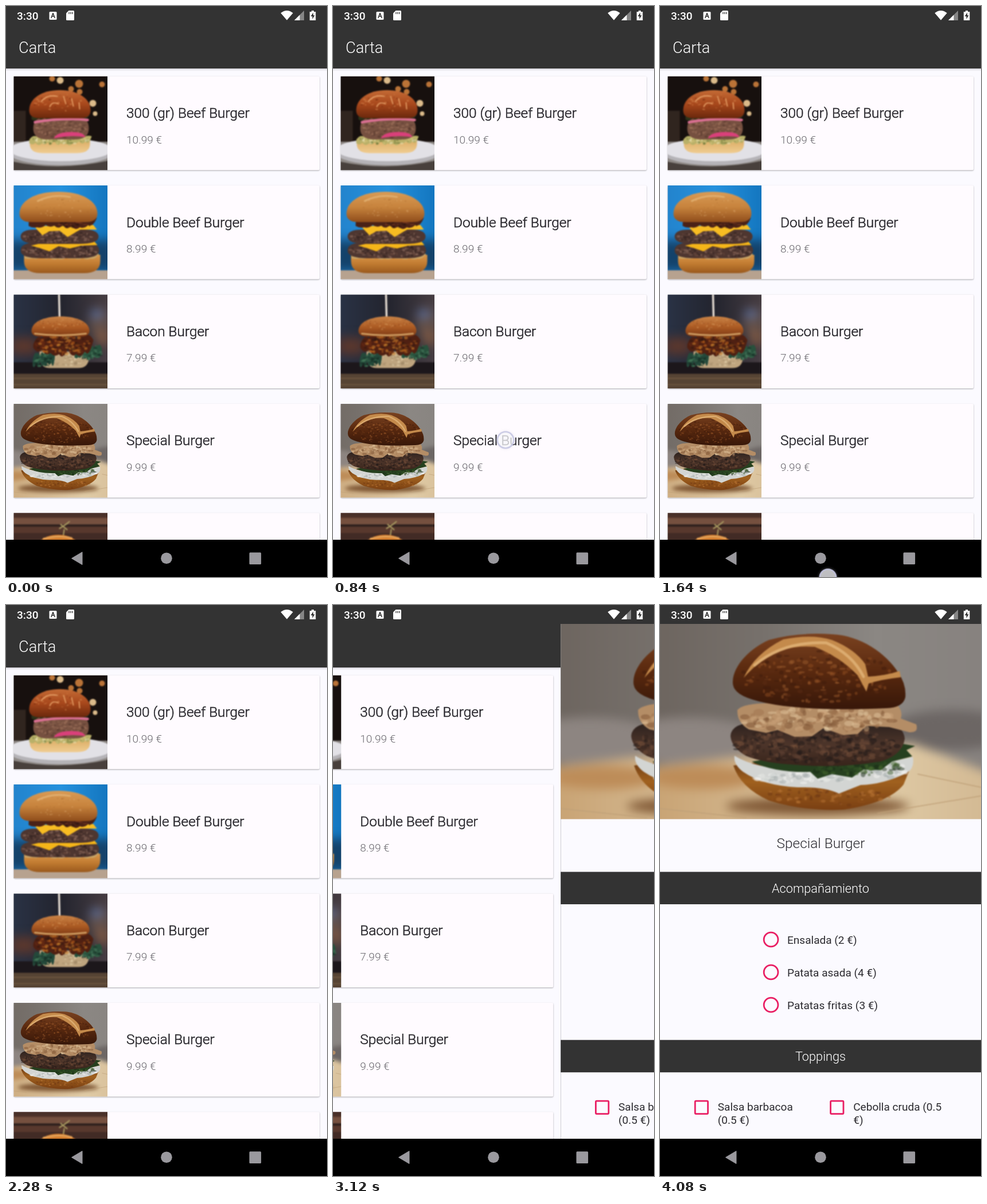
An HTML page for the animation above (4.12 s loop, 560 px wide and 996 px high).

```html
<!DOCTYPE html>
<html lang="es">
<head>
<meta charset="utf-8">
<title>Carta</title>
<style>
html, body { margin: 0; height: 100%; overflow: hidden; background: #000; }
svg { display: block; }
text { font-family: Roboto, sans-serif; fill: #2c2b30; }
.light { font-weight: 300; }
.title { font-weight: 300; font-size: 24.4px; }
.strong { stroke: #2c2b30; stroke-width: .6px; }
.price { font-weight: 300; font-size: 19.06px; fill: #6b696f; }
.bar { font-weight: 300; font-size: 21.78px; fill: #fff; text-anchor: middle; }
.option { font-size: 19.06px; }
.card { fill: #fffbff; filter: drop-shadow(0 1px 1.2px #0005); }
.pink { fill: none; stroke: #e91e63; stroke-width: 2.8px; }
.soft { filter: blur(.8px); }
.blurred { filter: blur(9px); }
#pointer { filter: drop-shadow(0 0 2px #ccd8); }
</style>
</head>
<body>
<svg id="stage" width="100%" height="100%" viewBox="0 0 560 996"></svg>
<script>
const LOOP = 4120;
const stage = document.getElementById('stage');

let seed = 7;
const rand = () => (seed = seed * 16807 % 2147483647) / 2147483647;

const rect = (x, y, w, h, fill, rx = 0) =>
  `<rect x="${x}" y="${y}" width="${w}" height="${h}" fill="${fill}" rx="${rx}"/>`;
const ellipse = (x, y, rx, ry, fill, extra = '') =>
  `<ellipse cx="${x}" cy="${y}" rx="${rx}" ry="${ry}" fill="${fill}" ${extra}/>`;
const path = (d, fill, extra = '') => `<path d="${d}" fill="${fill}" ${extra}/>`;
const line = (d, color, width) =>
  path(d, 'none', `stroke="${color}" stroke-width="${width}" stroke-linecap="round" stroke-linejoin="round"`);
const text = (x, y, cls, str, extra = '') => `<text x="${x}" y="${y}" class="${cls}" ${extra}>${str}</text>`;
const crop = (x, y, w, h, body) => `<svg x="${x}" y="${y}" width="${w}" height="${h}">${body}</svg>`;
const group = (cls, ...parts) => `<g class="${cls}">${parts.join('')}</g>`;

const grad = (id, dir, ...colors) =>
  `<linearGradient id="${id}" x2="${dir === 'h' ? 1 : 0}" y2="${dir === 'h' ? 0 : 1}">` +
  colors.map((c, i) => `<stop offset="${i / (colors.length - 1)}" stop-color="${c}"/>`).join('') +
  '</linearGradient>';

// Bun top, patty and bun base between the given edges
function dome(l, r, t, b, fill) {
  const w = r - l, h = b - t, m = (l + r) / 2, k = b - h * .28;
  return path(`M${l} ${k}C${l} ${t + h * .3} ${l + w * .2} ${t} ${m} ${t}S${r} ${t + h * .3} ${r} ${k}` +
    `Q${r} ${b} ${r - w * .16} ${b}H${l + w * .16}Q${l} ${b} ${l} ${k}Z`, fill);
}

function patty(l, r, t, b, fill) {
  const w = r - l, m = (t + b) / 2;
  return path(`M${l} ${m}Q${l} ${t} ${l + w * .18} ${t}H${r - w * .18}Q${r} ${t} ${r} ${m}` +
    `Q${r} ${b} ${r - w * .26} ${b}H${l + w * .26}Q${l} ${b} ${l} ${m}Z`, fill);
}

function base(l, r, t, b, fill) {
  const w = r - l, k = t + (b - t) * .35;
  return path(`M${l} ${t}H${r}V${k}Q${r} ${b} ${r - w * .22} ${b}H${l + w * .22}Q${l} ${b} ${l} ${k}Z`, fill);
}

// Irregular strip for sauce, cheese and leaves
function ragged(l, r, t, b, n, fill) {
  const step = (r - l) / n, h = b - t;
  let d = `M${l} ${t + h * .5}`;
  for (let i = 1; i <= n; i++) d += `Q${l + (i - .5) * step} ${t - h * .3 * rand()} ${l + i * step} ${t + h * .3 * rand()}`;
  for (let i = n; i > 0; i--) d += `Q${l + (i - .5) * step} ${b + h * .4 * rand()} ${l + (i - 1) * step} ${b - h * .4 * rand()}`;
  return path(d + 'Z', fill);
}

function specks(n, x, y, rx, ry, size, ...colors) {
  let out = '';
  for (let i = 0; i < n; i++) {
    const a = rand() * 6.283, d = Math.sqrt(rand());
    out += ellipse((x + Math.cos(a) * d * rx).toFixed(1), (y + Math.sin(a) * d * ry).toFixed(1),
      (size * (.4 + rand())).toFixed(1), (size * (.3 + rand() * .6)).toFixed(1),
      colors[i % colors.length], 'opacity=".5"');
  }
  return out;
}

const defs = '<defs>' +
  grad('glazed', 'v', '#c46b35', '#a8481c', '#6a270c') +
  grad('golden', 'v', '#d99b55', '#c7833d', '#8f4d1b') +
  grad('base', 'v', '#d9964a', '#c07a30', '#99591d') +
  grad('pale', 'v', '#d9a95f', '#f0cd92') +
  grad('meat', 'v', '#2b211e', '#4d352a', '#38241b') +
  grad('sky', 'h', '#2383cc', '#2591dd', '#1274bd') +
  grad('dusk', 'h', '#2a3346', '#23242e', '#493f44') +
  grad('toasted', 'v', '#c98346', '#ae5d25', '#7c3914') +
  grad('pretzel', 'v', '#7a4220', '#59290f', '#371709') +
  grad('crust', 'v', '#5a2c0e', '#a0611f', '#7a3f12') +
  grad('wall', 'h', '#6d655f', '#77716c', '#8b8783', '#87827f') +
  grad('wood', 'h', '#c8a272', '#d3b78f', '#e0cba6', '#d2b892') +
  '</defs>';

const tallBurger = group('soft',
  rect(-10, -30, 580, 400, 'url(#wall)'),
  group('blurred',
    ellipse(50, 205, 130, 42, '#8d8581'), ellipse(510, 185, 110, 35, '#6c6664'),
    path('M-20 250L130 232L440 208L580 262V400H-20Z', 'url(#wood)'),
    ellipse(75, 268, 95, 20, '#bd8c58'), ellipse(275, 318, 160, 16, '#7d5532')),
  line('M0 322L150 338M380 330L560 300M450 262L560 285', '#bfa078', 1.5),
  path('M128 247Q140 285 190 308Q250 327 320 324Q400 312 425 280L437 250L300 225Z', 'url(#crust)'),
  specks(90, 285, 302, 120, 15, 4, '#b87433', '#6d3814', '#8f501c'),
  path('M130 230Q165 252 240 255Q320 262 380 245L441 232Q445 252 430 260Q390 280 350 281L312 296Q290 284 240 285Q180 282 145 258Q128 245 130 230Z', '#d3d5d3'),
  specks(70, 250, 269, 90, 9, 5, '#f6f6f4', '#a4abab', '#e8e9e6'),
  specks(35, 400, 255, 35, 13, 5, '#f6f6f4', '#a4abab'),
  path('M160 240Q200 260 262 258L275 270L300 262L335 268L355 254L385 255L405 240L440 231L430 220L445 213L400 205Z', '#26401f'),
  specks(70, 345, 250, 85, 14, 5, '#46672d', '#182915', '#335426'),
  path('M123 195Q125 172 170 172H395Q425 178 427 200Q424 228 385 240Q310 252 240 246Q180 243 150 230Q124 215 123 195Z', 'url(#meat)'),
  specks(300, 273, 212, 143, 32, 5, '#1d1718', '#765039', '#34241d', '#5d4031'),
  path('M135 150Q150 134 230 140L410 138Q425 150 420 165L447 175Q452 190 435 189L400 180L360 178L345 192L320 194L285 182L265 196L235 197L205 185L185 190L155 184Q134 172 135 150Z', '#b48d66'),
  specks(150, 275, 167, 135, 20, 7, '#dfc39c', '#7d5334', '#cda57c', '#a0744d'),
  path('M127 100C128 72 158 42 190 28Q240 14 300 18C350 20 395 52 415 84Q430 105 428 128Q424 146 395 147Q290 152 215 143Q150 134 134 118Q126 110 127 100Z', 'url(#pretzel)'),
  specks(220, 275, 92, 132, 45, 4, '#8d4b20', '#401b0c', '#9a5a2b', '#5c2c13'),
  path('M146 94Q165 52 215 27Q265 17 300 28Q340 44 358 70L363 92Q395 90 418 82L420 93Q385 97 364 104L360 118L345 90Q315 58 270 40Q215 36 180 62Q160 78 146 94Z', '#c48a4b'),
  line('M165 72Q215 30 290 33Q335 52 355 92', '#dcac70', 5));

const photos = [
  group('soft',
    rect(-5, -5, 175, 175, '#17100e'),
    [[81, 7, 6], [67, 4, 5], [114, 13, 7], [138, 47, 6], [127, 64, 5], [115, 27, 5], [142, 65, 4], [100, 22, 5], [154, 14, 5]]
      .map(([x, y, r], i) => ellipse(x, y, r, r, i % 3 ? '#d7853e' : '#ffd9a0', 'opacity=".85"')).join(''),
    rect(-5, 60, 26, 55, '#30251f'),
    rect(-5, 114, 175, 60, '#8f8a87'),
    ellipse(82, 132, 92, 23, '#b5b3b7'), ellipse(82, 128, 90, 20, '#e2e1e6'),
    path('M-5 148Q80 167 170 146V170H-5Z', '#48403c'),
    base(28, 133, 109, 134, 'url(#pale)'),
    ragged(27, 136, 104, 118, 10, '#b9b068'), specks(60, 82, 111, 52, 7, 2.6, '#5d6d30', '#f3e8bb', '#d9c67e'),
    patty(34, 131, 72, 110, '#765040'),
    specks(140, 82, 90, 45, 17, 2.4, '#a57860', '#4f3329', '#906550'),
    path('M70 108Q75 97 100 97Q122 97 125 106Q100 102 70 108Z', '#d9407a'),
    ragged(31, 132, 65, 76, 9, '#2b3219'),
    line('M37 80Q82 72 129 76', '#d96f92', 4.5),
    dome(27, 134, 24, 73, 'url(#glazed)'),
    specks(40, 80, 48, 44, 18, 2, '#d98a50', '#7c2e0f'),
    line('M48 44Q58 31 76 35M63 53Q67 43 78 48M87 35L91 48M101 39L104 52M114 46L115 57', '#e6a067', 1.8)),
  group('soft',
    rect(-5, -5, 175, 175, 'url(#sky)'),
    group('blurred', rect(-15, 95, 195, 55, '#14426a')),
    rect(-5, 148, 175, 25, '#b7a28f'),
    base(18, 151, 121, 153, 'url(#base)'),
    ragged(19, 149, 119, 128, 9, '#c9a466'),
    patty(12, 149, 100, 127, '#4e3630'),
    specks(150, 80, 114, 64, 12, 2.6, '#9c7768', '#2c1e1c', '#6b4a3e'),
    path('M30 105L60 98L140 97L146 104L118 105L98 110L78 106L62 115L45 109Z', '#f4b519'),
    patty(12, 148, 77, 102, '#4e3630'),
    specks(150, 80, 90, 63, 11, 2.6, '#9c7768', '#2c1e1c', '#6b4a3e'),
    path('M35 71L139 69L145 77L116 77L94 90L80 79L62 80L50 87Z', '#f8bc22'),
    ragged(26, 145, 56, 73, 8, '#4a2217'),
    specks(30, 110, 66, 32, 8, 3, '#7d3b22', '#2c1410'),
    dome(10, 146, 11, 64, 'url(#golden)'),
    line('M42 27Q68 14 98 20', '#e0ad6d', 3),
    specks(40, 78, 40, 58, 18, 1.5, '#e3b479', '#a9692d')),
  group('soft',
    rect(-5, -5, 175, 175, 'url(#dusk)'),
    group('blurred', rect(-5, 75, 45, 30, '#5b372d'), ellipse(150, 49, 18, 28, '#62504a'), ellipse(145, 34, 12, 6, '#5474b2'), ellipse(155, 75, 10, 14, '#855b42')),
    rect(-5, 118, 175, 21, '#1c171b'), rect(-5, 138, 175, 32, '#564434'),
    line('M0 146H163M0 157H163', '#6d553e', 2),
    line('M79 0L80 40', '#e8dfd5', 3.4),
    base(45, 131, 99, 128, '#bfa57f'),
    specks(60, 88, 114, 36, 10, 2.6, '#e6d4b0', '#a18a67'),
    ragged(33, 72, 102, 126, 6, '#24483a'), ragged(106, 154, 88, 112, 7, '#28503c'),
    specks(60, 130, 100, 24, 13, 3, '#4d8463', '#162d24', '#376a4c'),
    specks(45, 52, 114, 18, 12, 3, '#44795a', '#162d24'),
    ragged(34, 139, 70, 104, 7, '#4f2012'),
    specks(140, 86, 87, 48, 17, 3.2, '#c4661c', '#6c2c14', '#d98a2e', '#2b1510'),
    dome(31, 132, 38, 73, 'url(#toasted)'),
    line('M37 68Q80 74 126 68', '#cf9d62', 3),
    specks(50, 82, 52, 42, 11, 1.4, '#e0a466', '#874119')),
  '<use href="#special" transform="translate(-43.5 7.5) scale(.44)"/>',
  group('soft',
    rect(-5, -5, 175, 175, '#58382d'), rect(-5, -5, 175, 12, '#493028'),
    rect(-5, 9, 175, 11, '#75503f'), rect(-5, 20, 175, 4, '#30211e'), rect(-5, 35, 175, 60, '#422b25'),
    line('M86 43L88 29M80 27L94 18M82 20L93 29M92 19L97 15', '#a79860', 2.2),
    dome(33, 122, 38, 95, '#cf7a2d'), line('M52 45Q80 38 101 44', '#e6a45a', 3))
];

const dishes = [
  ['300 (gr) Beef Burger', '10.99 €'],
  ['Double Beef Burger', '8.99 €'],
  ['Bacon Burger', '7.99 €'],
  ['Special Burger', '9.99 €'],
  ['', '']
];

const card = ([name, price], i) => {
  const y = 122.7 + i * 190.4;
  return `<rect class="card" x="13.5" y="${y}" width="533.5" height="163.5" rx="2"/>` +
    crop(13.5, y, 163.5, 163.5, photos[i]) +
    text(210, y + 72.5, 'title strong', name) + text(210, y + 116.8, 'price', price);
};

const menu = rect(0, 33, 560, 900, '#fbfaff') + rect(0, 109, 560, 2, '#dddce2') + rect(0, 111, 560, 2, '#f0eff5') +
  rect(0, 33, 560, 76, '#333') + text(22, 82, 'light', 'Carta', 'style="fill:#fff;font-size:27.2px"') +
  dishes.map(card).join('');

const heading = (y, label) => rect(0, y, 560, 56.5, '#333') + text(280, y + 36.7, 'bar', label);
const radio = (label, i) => `<circle class="pink" cx="193.6" cy="${583.5 + i * 57}" r="12.4"/>` +
  text(222, 590.5 + i * 57, 'option', label);
const check = (x, a, b) => `<rect class="pink" x="${x}" y="865.2" width="22.4" height="22.4" rx="1.5"/>` +
  text(x + 39.6, 882.3, 'option', a) + text(x + 39.6, 904.6, 'option', b);

const detail = rect(0, 33, 560, 900, '#fbfaff') +
  crop(0, 33, 560, 340.5, '<use href="#special"/>') +
  text(280.5, 423.7, 'title', 'Special Burger', 'text-anchor="middle"') +
  heading(465.5, 'Acompañamiento') +
  ['Ensalada (2 €)', 'Patata asada (4 €)', 'Patatas fritas (3 €)'].map(radio).join('') +
  heading(758.7, 'Toppings') +
  check(61.2, 'Salsa barbacoa', '(0.5 €)') + check(297.6, 'Cebolla cruda (0.5', '€)');

const statusBar = rect(0, 0, 560, 33, '#333') +
  text(19, 24.3, '', '3:30', 'style="fill:#fff;font-size:19.06px;font-weight:500"') +
  rect(75.5, 10, 13, 14, '#fff', 1.5) + line('M79 20.5L82 12.5L85 20.5M80 18H84', '#333', 1.6) +
  path('M109.5 8H117.5Q119 8 119 9.5V23.5Q119 25 117.5 25H106.5Q105 25 105 23.5V12.5Z', '#fff') +
  line('M110 11V13.5M113 11V13.5M116 11V13.5', '#333', 1.3) +
  path('M479.3 12.3Q490 3.7 500.7 12.3L490 24.8Z', '#fff') +
  path('M520 8V25H503Z', '#858585') + path('M512.5 15.5V25H503Z', '#fff') +
  path('M533 10V8H537V10H540.3V25H529.8V10Z', '#fff') + path('M536 11.5L531.7 18H534.5V23L538.5 16.3H536Z', '#333');

const navBar = rect(0, 931, 560, 65, '#000') +
  path('M114.5 963.5L133 952.5V974.5Z', '#9a999e', 'stroke="#9a999e" stroke-linejoin="round"') +
  ellipse(280, 963.3, 9.8, 9.8, '#9a999e') + rect(424.5, 953.3, 20.6, 20.6, '#9a999e', 1.5);

stage.innerHTML = defs + `<defs><g id="special">${tallBurger}</g></defs>` +
  `<g id="menu">${menu}</g><g id="detail">${detail}</g>` + statusBar + navBar +
  '<circle id="pointer" r="14.2" fill="#fff" fill-opacity=".65" stroke="#c4c4e2" stroke-opacity=".85" stroke-width="2.6"/>';

const [menuPage, detailPage, pointer] = ['menu', 'detail', 'pointer'].map(id => document.getElementById(id));
const progress = (t, start, length) => Math.min(1, Math.max(0, (t - start) / length));
const ease = p => (1 - Math.cos(Math.PI * p)) / 2;
const move = (el, x, y) => el.setAttribute('transform', `translate(${x} ${y})`);

function draw(now) {
  const t = now % LOOP;
  const shift = 560 * ease(progress(t, 2976, 400));
  move(menuPage, -shift, 0);
  move(detailPage, 560 - shift, 0);

  const slide = progress(t, 1160, 560) ** 2;
  move(pointer, 301 - 10.9 * slide, 757 + 325 * slide);
  pointer.setAttribute('opacity', t < 1720 ? progress(t, 680, 120) : 0);
  requestAnimationFrame(draw);
}
requestAnimationFrame(draw);
</script>
</body>
</html>
```
